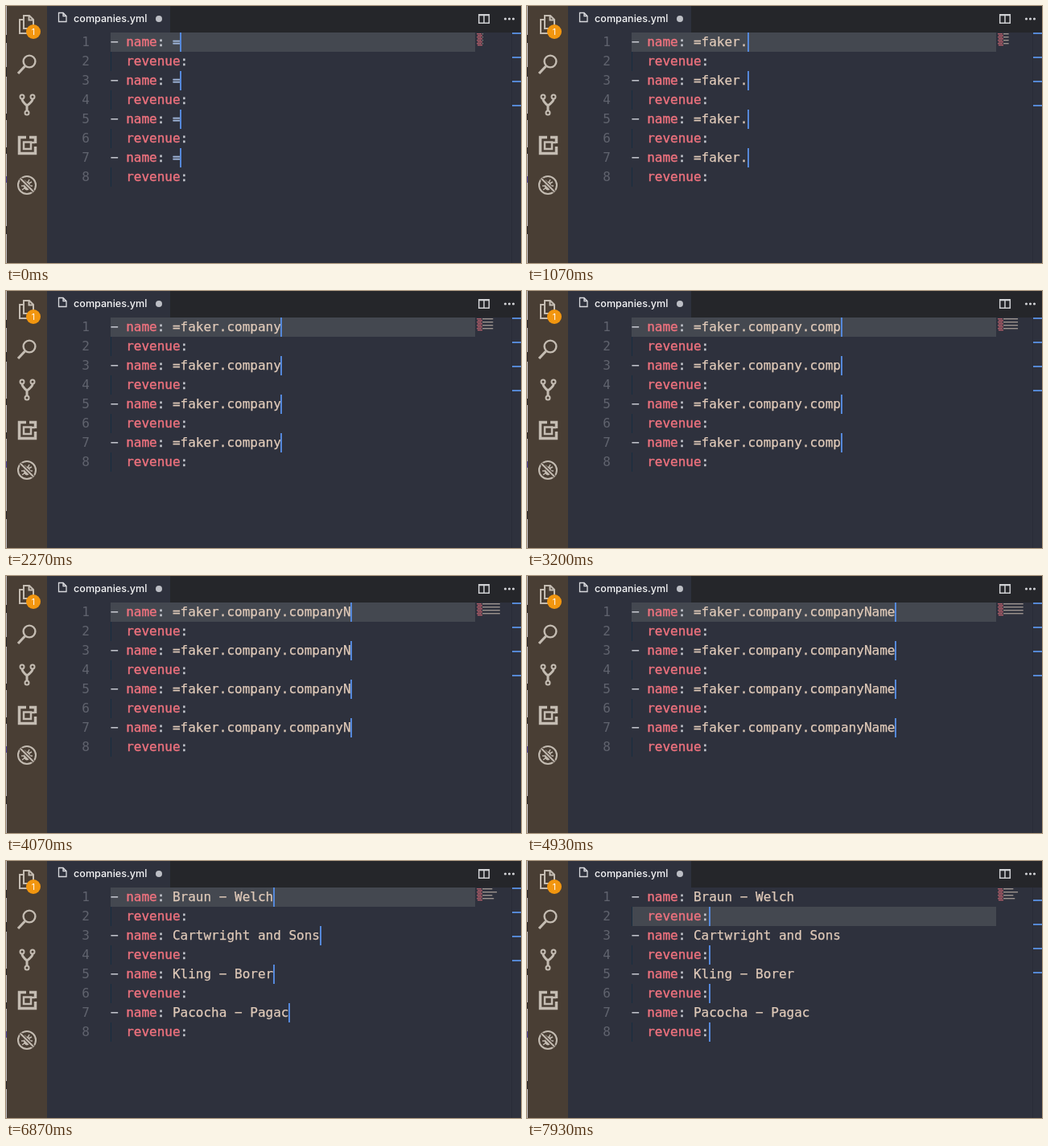
Animation of 640x320 px, one loop 8 s. Source, as an HTML page:

```html
<!DOCTYPE html>
<html lang="en">
<head>
<meta charset="utf-8">
<title>Multi-cursor editing</title>
<style>
  html, body { margin: 0; width: 100%; height: 100%; overflow: hidden; background: #2e313d; }
  svg { display: block; width: 640px; height: 320px; }
  .code text { font: 16px "DejaVu Sans Mono", monospace; white-space: pre; stroke-width: 0.4; }
  .code .number { fill: #60636e; text-anchor: end; }
  .code .mark { fill: #c9ccd3; stroke: #c9ccd3; }
  .code .key { fill: #ee727e; stroke: #ee727e; }
  .code .value { fill: #e0cab9; stroke: #e0cab9; stroke-width: 0.25; }
  .code .operator { fill: #9eb4d8; stroke: #9eb4d8; stroke-width: 0.5; }
  .icon { fill: none; stroke: #c4bcb2; stroke-width: 2; }
  .label { font: 500 12.6px Inter, sans-serif; fill: #f6f6f7; }
  .badge { font: 10.5px Inter, sans-serif; fill: #fff; text-anchor: middle; }
</style>
</head>
<body>
<svg viewBox="0 0 640 320">
  <rect width="640" height="320" fill="#2e313d"/>
  <rect x="51" width="589" height="33" fill="#25262a"/>
  <rect x="51" width="153" height="33" fill="#2e313d"/>
  <rect width="51" height="320" fill="#493e34"/>
  <rect width="1" height="320" fill="#c4c0c4"/>
  <path d="M0.5 36V46M0.5 76V88M0.5 134V142M0.5 176V184M0.5 274V284" stroke="#2a282c"/>
  <rect y="212" width="1" height="8" fill="#5146a0"/>

  <g class="icon">
    <path d="M21 17H17V34H27V29M22 12H29L34 17V28H22ZM28.5 12V17.5H34"/>
    <circle cx="29" cy="69" r="7.4" stroke-width="2.4"/>
    <path d="M23.5 75L15 84" stroke-width="3.2"/>
    <circle cx="20" cy="113" r="2.5"/>
    <circle cx="33" cy="113" r="2.5"/>
    <circle cx="26" cy="133" r="2.5"/>
    <path d="M20 116Q20 119 26 124V130M33 116Q33 119 26 124" stroke-width="3"/>
    <path d="M25 163.5H16.5V183.5H36.5V175M29 163.5H36.5V171" stroke-width="3.5"/>
    <path d="M22 169.5H31V178H22ZM31 170H36" stroke-width="2.5"/>
    <circle cx="26" cy="223" r="11"/>
    <ellipse cx="26" cy="224" rx="3" ry="4.5" fill="#c4bcb2"/>
    <path d="M19 224H33M20 229L24 226M32 219L28 221M23 217L25 220M29 216L27 220" stroke-width="1.5"/>
    <path d="M18 215L34 231" stroke="#493e34" stroke-width="4.5"/>
    <path d="M18 215L34 231"/>
  </g>
  <circle cx="34" cy="32" r="9" fill="#f2960f"/>
  <text class="badge" x="34" y="36">1</text>

  <path d="M65.5 8.5H71L75 12.5V19.5H65.5ZM71 8.5V12.5H75" fill="none" stroke="#d9dade" stroke-width="1.3"/>
  <text class="label" x="84" y="20">companies.yml</text>
  <circle cx="190" cy="16" r="4" fill="#bcbec5"/>
  <path d="M587.7 10.7H600.3V21.3H587.7ZM594 10V22M587 11.5H601" fill="none" stroke="#d0d1d4" stroke-width="1.5"/>
  <g fill="#d0d1d4">
    <circle cx="620.5" cy="16" r="1.6"/><circle cx="625.5" cy="16" r="1.6"/><circle cx="630.5" cy="16" r="1.6"/>
  </g>

  <rect id="active" x="130" width="453" height="24" fill="#444850"/>
  <path d="M628.5 33V320" stroke="#292c37"/>
  <g id="code" class="code"></g>
  <g id="minimap"></g>
</svg>
<script>
const LOOP = 8000, LEFT = 129.9, CHAR = 9.632, TOP = 33, ROW = 24;
const TYPED = "faker.company.companyName";
const RESULTS = ["Braun − Welch", "Cartwright and Sons", "Kling − Borer", "Pacocha − Pagac"];
const TYPE_STEP = 178, TYPE_OFFSET = -60, NAME_PAUSE = 150;
const GENERATE = 5600, MOVE_DOWN = 6880, BLINK = 500;
const code = document.getElementById("code");
const minimap = document.getElementById("minimap");
const active = document.getElementById("active");

function add(parent, tag, attrs, text = "") {
  const node = document.createElementNS("http://www.w3.org/2000/svg", tag);
  for (const name in attrs) node.setAttribute(name, attrs[name]);
  node.textContent = text;
  parent.append(node);
  return node;
}

const rowTop = row => TOP + row * ROW;
const column = n => LEFT + n * CHAR;

function write(row, col, text, kind) {
  return add(code, "text", { x: column(col), y: rowTop(row) + 17, class: kind }, text);
}

function mini(row, col, width, fill) {
  return add(minimap, "rect", { x: 585 + col, y: 34 + row * 2, width, height: 1.4, fill, opacity: 0.65 });
}

const entries = RESULTS.map((result, i) => {
  const row = i * 2;
  for (const r of [row, row + 1])
    add(code, "text", { x: 104, y: rowTop(r) + 17, class: "number" }, r + 1);
  add(code, "rect", { x: 130, y: rowTop(row + 1), width: 1, height: ROW, fill: "#182d40" });
  write(row, 0, "−", "mark");
  write(row, 2, "name", "key");
  write(row, 6, ":", "mark");
  write(row + 1, 2, "revenue", "key");
  write(row + 1, 9, ":", "mark");
  mini(row, 0, 6, "#ee727e");
  mini(row + 1, 1, 6, "#ee727e");
  return {
    result, row,
    value: write(row, 8, "", "value"),
    cursor: add(code, "rect", { width: 2, height: ROW, fill: "#5588da" }),
    tail: mini(row, 7, 1, "#d8c8bb"),
    ruler: add(minimap, "rect", { x: 629, width: 11, height: 2, fill: "#5588d4" })
  };
});

const keyTimes = [...TYPED].map((_, i) =>
  (i + 1) * TYPE_STEP + TYPE_OFFSET + (i >= 21 ? NAME_PAUSE : 0));
const actions = [0, ...keyTimes, GENERATE, MOVE_DOWN];

function render(t) {
  const count = keyTimes.filter(time => time <= t).length;
  const down = t >= MOVE_DOWN ? 1 : 0;
  const lastAction = actions.filter(time => time <= t).pop();
  const visible = (t - lastAction) % (2 * BLINK) < BLINK;

  active.setAttribute("y", rowTop(down));
  entries.forEach(({ result, row, value, cursor, tail, ruler }, i) => {
    const text = t >= GENERATE ? result : "=" + TYPED.slice(0, count);
    value.textContent = text;
    value.setAttribute("class", text === "=" ? "operator" : "value");
    cursor.setAttribute("x", Math.round(column(down ? 10 : 8 + text.length) - 0.4));
    cursor.setAttribute("y", rowTop(row + down));
    cursor.style.visibility = visible ? "visible" : "hidden";
    tail.setAttribute("width", text.length * 0.95);
    ruler.setAttribute("y", 33 + i * 30 + down * 15);
  });
}

const start = performance.now();
function frame() {
  render((performance.now() - start) % LOOP);
  requestAnimationFrame(frame);
}
frame();
</script>
</body>
</html>
```
